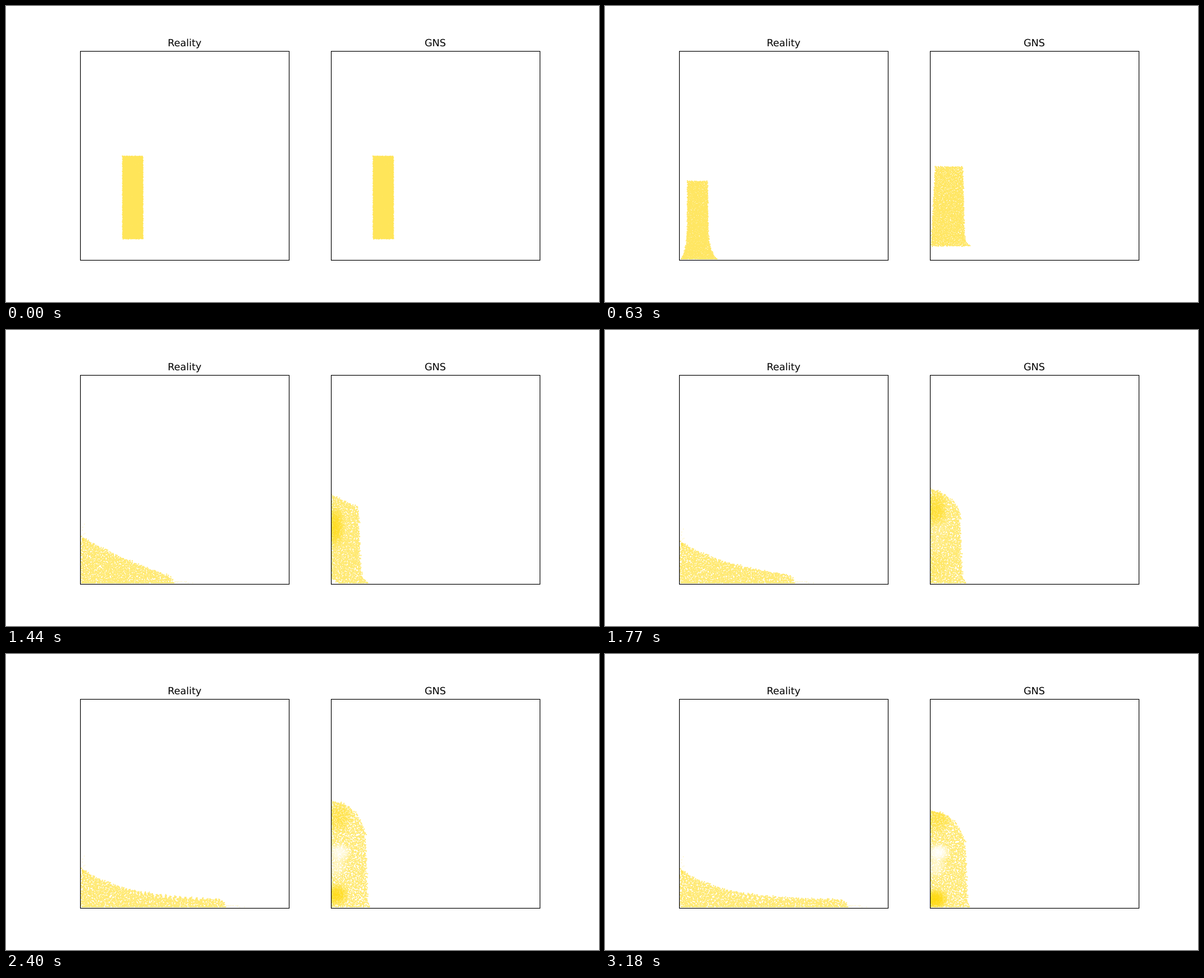
An HTML page with a canvas that plays this animation: 1000 px wide and 500 px high, repeating every 3.21 s.

```html
<!DOCTYPE html>
<html lang="en">
<head>
<meta charset="utf-8">
<title>Reality and GNS</title>
<style>
  html, body { margin: 0; width: 100%; height: 100%; overflow: hidden; background: #fff; }
  canvas, svg { position: absolute; left: 0; top: 0; width: 1000px; height: 500px; }
  text { font: 16.667px "DejaVu Sans", sans-serif; text-anchor: middle; text-rendering: geometricPrecision; }
  rect { fill: none; stroke: #000; stroke-width: 1.11; }
</style>
</head>
<body>
<canvas id="sand" width="1000" height="500"></canvas>
<svg viewBox="0 0 1000 500">
  <rect x="125.5" y="76.5" width="352" height="353"/>
  <rect x="548.5" y="76.5" width="352" height="353"/>
  <text x="301.1" y="68">Reality</text>
  <text x="723.9" y="68">GNS</text>
</svg>
<script>
const LOOP = 3210, STEP = 30, GRAINS = 2600, ROWS = 48;
const FLOOR = 428, WALL_A = 127, WALL_B = 549;
const ctx = document.getElementById('sand').getContext('2d');

const gold = a => `rgba(255,215,0,${a})`;
const white = a => `rgba(255,255,255,${a})`;
const clamp = v => Math.max(0, Math.min(1, v));
const mix = (a, b, k) => a + (b - a) * k;
const ramp = (t, from, to) => {
  const s = clamp((t - from) / (to - from));
  return s * s * (3 - 2 * s);
};

let seed = 7;
function rand() {
  seed = (seed * 16807) % 2147483647;
  return seed / 2147483647;
}

// Free fall in pixels after n steps
const fall = n => 0.117 * n * n - 0.45 * n;

// A pose gives y, left and right of the sand at p, from 0 (top) to 1 (bottom)

function realityColumn(t) {
  const n = t / STEP;
  const top = 253.5 + fall(n), height = Math.max(0, Math.min(140, FLOOR - top));
  const x = Math.max(WALL_A + 1, 196.5 - 2.73 * n);
  const foot = 16 * clamp((n - 18) / 3);
  return p => {
    const flare = foot * Math.exp(-height * (1 - p) / 16);
    return { y: top + height * p, left: Math.max(WALL_A, x - 0.75 * flare), right: x + 34.5 + flare };
  };
}

function realityPile(t) {
  const reach = Math.max(1, 340 * (1 - Math.exp(-(t - 519) / 1490)));
  const flat = 1 - Math.exp(-Math.max(0, t - 1140) / 400);
  return p => {
    const x = reach * p;
    const wedge = 96 * (1 - Math.pow(p, 1.1));
    const sheet = 13 + 52 * Math.exp(-x / 72);
    const nose = Math.sqrt(Math.min(1, (reach - x) / 10));
    return { y: FLOOR + 1 - mix(wedge, sheet, flat) * nose, left: WALL_A, right: WALL_A + x };
  };
}

function gnsBlock(t) {
  const n = Math.min(21, t / STEP), s = n / 21, drop = fall(n) / fall(21);
  const top = 253.5 + 18 * drop, bottom = 393.5 + 12 * drop;
  const foot = 10 * clamp((n - 17) / 4);
  return p => ({
    y: mix(top, bottom, p),
    left: 619 - s * (62 + 7 * p),
    right: 653.5 - s * (50 - 3 * p) + foot * Math.exp(-(1 - p) * 22)
  });
}

function gnsHeap(t) {
  const top = 271 + 8 * ramp(t, 1000, 1440) - 31 * ramp(t, 1440, 2300) + 17 * ramp(t, 2300, 3180);
  const width = 43 + 14 * ramp(t, 1140, 2700);
  const round = 1 + ramp(t, 1440, 2100);
  const crown = 21 + 44 * ramp(t, 1440, 2200);
  const toe = 16 - 12 * ramp(t, 1140, 2100);
  const bite = 30 * (1 - ramp(t, 1000, 1700));
  return p => {
    const y = mix(top, FLOOR, p), z = FLOOR - y;
    const depth = clamp((y - top) / crown);
    const dome = Math.pow(1 - Math.pow(1 - depth, round), 1 / round);
    return {
      y,
      left: WALL_B + 1.25 * Math.max(0, bite - z),
      right: WALL_B + width * dome + 5 * p + toe * Math.exp(-z / 8)
    };
  };
}

function rowsOf(from, to, k) {
  return Array.from({ length: ROWS + 1 }, (_, i) => {
    const a = from(i / ROWS), b = to(i / ROWS);
    return { y: mix(a.y, b.y, k), left: mix(a.left, b.left, k), right: mix(a.right, b.right, k) };
  });
}

const grains = Array.from({ length: GRAINS }, (_, i) => ({
  rank: (i + 0.5) / GRAINS,
  u: (i * 0.618034) % 1,
  dx: rand() + rand() - 1,
  dy: rand() + rand() - 1
}));
const strays = Array.from({ length: 36 }, () => [rand(), rand(), rand()]);

// Spreads the grains evenly over the area of the pose
function drawGrains(rows, loose) {
  const filled = [0];
  for (let i = 0; i < ROWS; i++) {
    const a = rows[i], b = rows[i + 1];
    const width = (a.right - a.left + b.right - b.left) / 2;
    filled.push(filled[i] + width * Math.max(0.001, b.y - a.y));
  }
  const shake = 0.3 + 2.2 * loose;
  let n = 0;
  ctx.beginPath();
  for (const g of grains) {
    const at = g.rank * filled[ROWS];
    while (n < ROWS - 1 && at > filled[n + 1]) n++;
    const s = (at - filled[n]) / (filled[n + 1] - filled[n]);
    const a = rows[n], b = rows[n + 1];
    const x = mix(mix(a.left, b.left, s), mix(a.right, b.right, s), g.u) + g.dx * shake;
    const y = mix(a.y, b.y, s) + g.dy * shake;
    ctx.rect(x - 1, Math.min(y, FLOOR - 1) - 1, 2, 2);
  }
  ctx.fillStyle = gold(0.65 - 0.1 * loose);
  ctx.fill();
}

// Loose grains along the wall and ahead of the pile
function drawStrays(rows, amount) {
  const front = rows[ROWS].right;
  ctx.fillStyle = gold(0.25 * amount);
  strays.forEach(([a, b, c], i) => {
    if (i % 3) ctx.fillRect(WALL_A + 6 * a, rows[0].y + 8 - 40 * b * b * c, 1.4, 1.4);
    else ctx.fillRect(front + 44 * a * a, FLOOR - 1 - 3 * b, 1.4, 1.4);
  });
}

function drawSpot(x, y, rx, ry, strength, tint) {
  ctx.save();
  ctx.translate(x, y);
  ctx.scale(rx, ry);
  const shade = ctx.createRadialGradient(0, 0, 0, 0, 0, 1);
  shade.addColorStop(0, tint(strength));
  shade.addColorStop(0.45, tint(strength * 0.8));
  shade.addColorStop(1, tint(0));
  ctx.fillStyle = shade;
  ctx.fillRect(-1, -1, 2, 2);
  ctx.restore();
}

// Sand gathers at the crown and the floor and thins out between
function drawSpots(rows, t) {
  ctx.beginPath();
  for (const r of rows) ctx.lineTo(r.right, r.y);
  for (const r of [...rows].reverse()) ctx.lineTo(r.left, r.y);
  ctx.clip();
  const rise = ramp(t, 1440, 2100), split = ramp(t, 1440, 2700);
  const crownY = 322 + 10 * ramp(t, 1140, 1440) - 56 * rise;
  drawSpot(555 + 5 * rise, crownY, 17 + 11 * rise, 38 - 8 * rise, 0.7 * ramp(t, 800, 1140) - 0.3 * rise, gold);
  drawSpot(557, 396 + 18 * ramp(t, 1440, 3180), 24, 28 - 8 * split, 0.9 * split, gold);
  drawSpot(562, 335, 22, 17, split, white);
  drawSpot(556, 358, 22, 22, 0.6 * split, white);
}

function drawPanel(x, rows, loose, extras) {
  ctx.save();
  ctx.beginPath();
  ctx.rect(x, 77, 351, 352);
  ctx.clip();
  drawGrains(rows, loose);
  extras(rows);
  ctx.restore();
}

function render(now) {
  const t = Math.floor((now % LOOP) / STEP) * STEP;
  const loose = clamp((t - 300) / 900);
  const reality = rowsOf(realityColumn(t), realityPile(t), ramp(t, 600, 1140));
  const gns = rowsOf(gnsBlock(t), gnsHeap(t), ramp(t, 630, 1140));
  ctx.clearRect(0, 0, 1000, 500);
  drawPanel(126, reality, loose, rows => drawStrays(rows, clamp((t - 800) / 300)));
  drawPanel(549, gns, loose, rows => drawSpots(rows, t));
}

let begin;
function tick(now) {
  if (begin === undefined) begin = now;
  render(now - begin);
  requestAnimationFrame(tick);
}
render(0);
requestAnimationFrame(tick);
</script>
</body>
</html>
```
